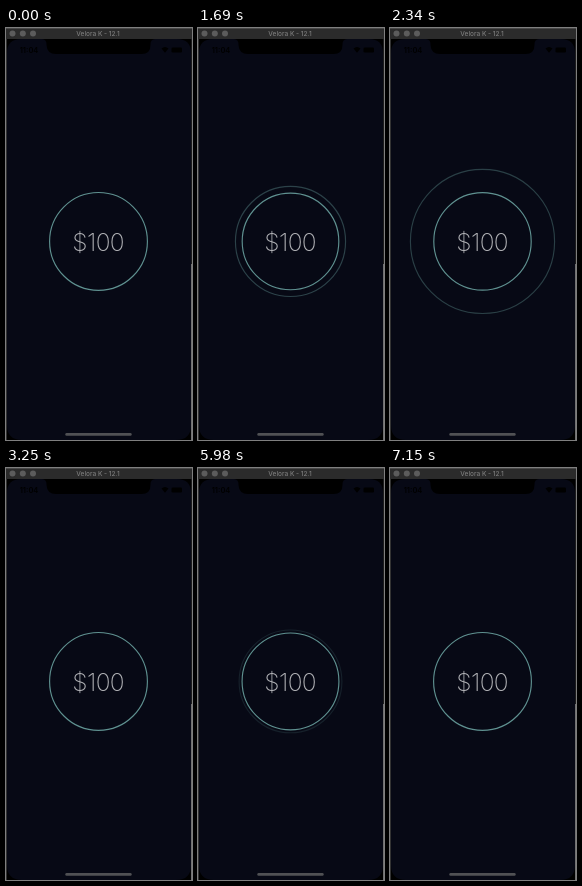
Recreate the animation shown at these times as an HTML page. Size 186 px wide and 412 px high, loop 7.28 s.

```html
<!DOCTYPE html>
<html lang="en">
<head>
<meta charset="utf-8">
<title>Pulse button</title>
<style>
  html, body { margin: 0; width: 100%; height: 100%; overflow: hidden; background: #000; }
  svg { display: block; width: 100vw; height: 100vh; }
  text { font-family: Inter, Roboto, sans-serif; text-anchor: middle; }
  .ring { fill: none; stroke: #5f9190; stroke-width: 1.15; }
</style>
</head>
<body>
<svg viewBox="0 0 186 412">
  <rect width="186" height="412" fill="#000"/>
  <path d="M1 412V25Q1 11 15 11H171Q185 11 185 25V397Q185 412 170 412H16Q1 412 1 397Z" fill="#070915"/>
  <path d="M36 11Q40.500 11.500 40.500 16V17Q41 26 50 26H135.500Q144.500 26 144.500 17V16Q144.500 11.500 149 11Z" fill="#000"/>

  <rect width="186" height="11" fill="#2b2b2b"/>
  <rect width="186" height="1" fill="#484848"/>
  <rect y="11" width="1" height="401" fill="#333"/>
  <rect x="185" y="11" width="1" height="225" fill="#1c1c1c"/>
  <rect x="185" y="236" width="1" height="176" fill="#707070"/>
  <g fill="#5c5c5c">
    <circle cx="6.500" cy="5.500" r="3"/>
    <circle cx="16.800" cy="5.500" r="3"/>
    <circle cx="27" cy="5.500" r="3"/>
  </g>
  <text x="92" y="8" font-size="6.500" font-weight="500" fill="#7c7c7c">Velora K - 12.1</text>

  <g fill="#000">
    <text x="23" y="25" font-size="7.500" font-weight="600">11:04</text>
    <path d="M155.500 20.500Q159 17.500 162.500 20.500L159 24.800Z"/>
    <rect x="165.500" y="19.500" width="10.500" height="5" rx="1.300"/>
  </g>

  <circle id="pulse" class="ring" cx="92.500" cy="213.400" r="49" opacity="0"/>
  <circle id="button" class="ring" cx="92.500" cy="213.400" r="49"/>
  <text x="92.200" y="222.500" font-size="24.500" font-weight="230" letter-spacing="-0.600" fill="#b0b1b5">$100</text>
  <rect x="59.300" y="405.100" width="66.400" height="2.700" rx="1.350" fill="#505154"/>
</svg>
<script>
  const LOOP = 7280, DURATION = 1500;
  const STARTS = [1000, 5542];
  const RADIUS = 48.9, SPREAD = 29, PRESS = 0.6;
  const pulse = document.getElementById('pulse');
  const button = document.getElementById('button');

  function draw(time) {
    const start = STARTS.find(s => time >= s && time < s + DURATION);
    const part = start === undefined ? 0 : (time - start) / DURATION;
    // The ring accelerates outward and is brightest halfway.
    const grow = part ** 2;
    pulse.setAttribute('r', RADIUS + SPREAD * grow);
    pulse.setAttribute('opacity', 1 - Math.abs(2 * grow - 1));
    // The button dips slightly while the ring is out.
    button.setAttribute('r', RADIUS - PRESS * Math.sin(Math.PI * part));
  }

  const origin = performance.now();
  function tick() {
    draw((performance.now() - origin) % LOOP);
    requestAnimationFrame(tick);
  }
  tick();
</script>
</body>
</html>
```
